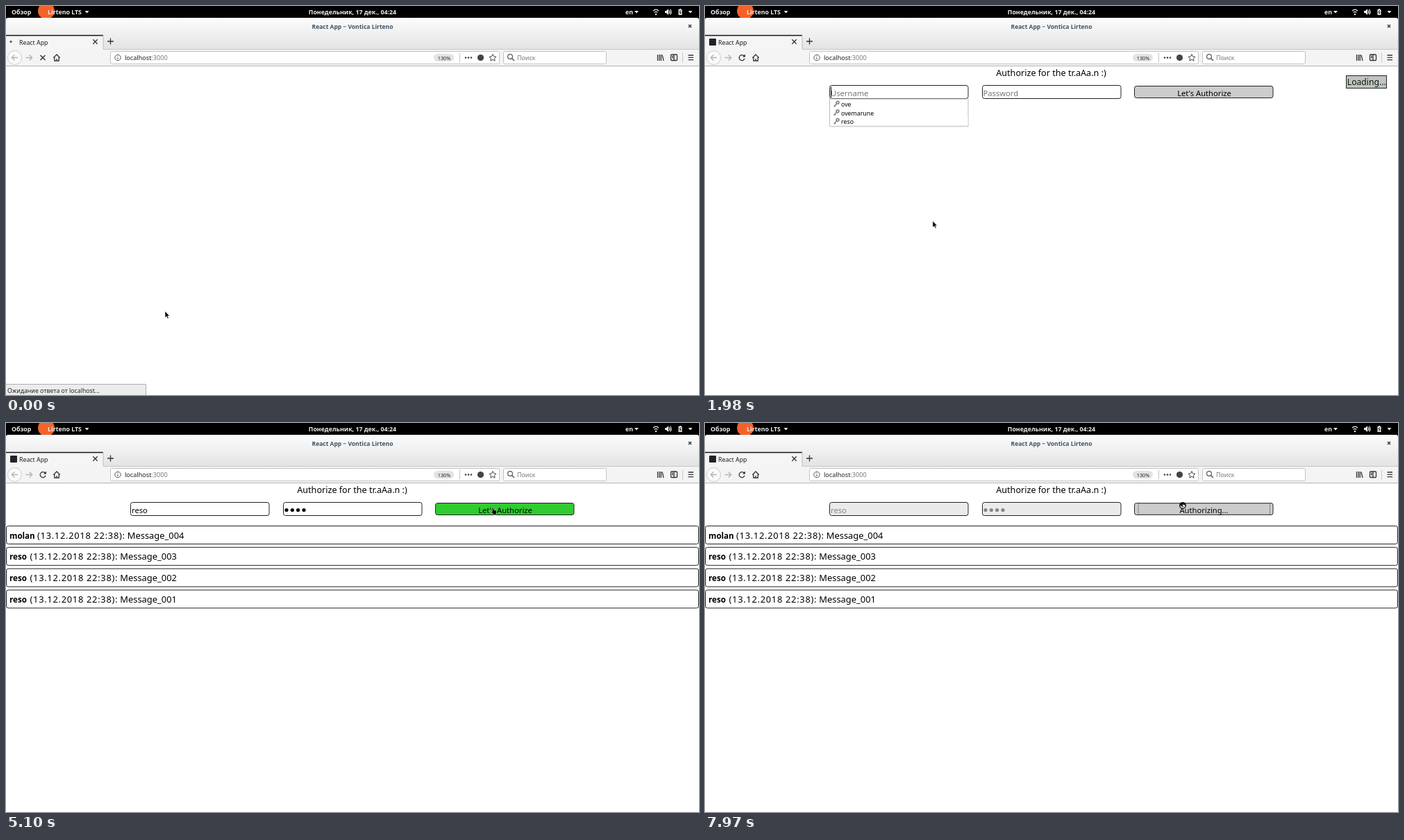
An HTML page for the animation above (8000 ms loop, 998 by 561 pixels).

```html
<!DOCTYPE html>
<html lang="ru">
<head>
<meta charset="utf-8">
<title>React App</title>
<style>
html, body { margin: 0; width: 100%; height: 100%; overflow: hidden; background: #fff; }
svg { display: block; width: 100vw; height: 100vh; font: 8.8px "Noto Sans", "Open Sans", sans-serif; }
.bar { font-weight: 600; fill: #eee; }
.mid { text-anchor: middle; }
.ink { fill: none; stroke: #333; stroke-width: 1.3; }
.off { fill: none; stroke: #b4b4b4; stroke-width: 1.3; }
.box { fill: #fff; stroke: #222; }
.hint { fill: #757575; }
.ctl { font-size: 11.2px; }
.msg { font-size: 12.9px; }
.who { font-size: 11.6px; font-weight: 700; }
.date { letter-spacing: .7px; }

/* one shared 8 s clock; 1% = 80 ms */
.wait, .page, .load, .ready, .blank, .filled, .drop, .row, .green, .label, .field, .value,
.before, .after, .edge, .list, .caret1, .caret2, .arrow, .hand { animation: 8s step-end infinite; }
.wait { animation-name: wait; }
.page { animation-name: page; }
.load { animation-name: load; }
.ready { animation-name: ready; }
.blank { animation-name: blank; }
.filled { animation-name: filled; }
.drop { animation-name: drop; }
.row { animation-name: row; }
.green { animation-name: green; }
.label { animation-name: label, before; }
.field { animation-name: field; }
.value { animation-name: filled, value; }
.after { animation-name: after; }
.edge { animation-name: edge; }
.list { animation-name: list; }
.caret1 { animation-name: caret1; }
.caret2 { animation-name: caret2; }
.arrow { animation-name: arrow; }
.hand { animation-name: hand; }
@keyframes wait { 0% { visibility: visible } 13.625%, to { visibility: hidden } }
@keyframes page { 0% { visibility: hidden } 13.625%, to { visibility: visible } }
@keyframes load { 0%, 51.625%, to { visibility: hidden } 13.625% { visibility: visible } }
@keyframes ready { 0% { visibility: hidden } 18.75%, to { visibility: visible } }
@keyframes blank { 0%, 47.75%, to { visibility: hidden } 13.625% { visibility: visible } }
@keyframes filled { 0% { visibility: hidden } 47.75%, to { visibility: visible } }
@keyframes drop { 0%, 47.75%, to { visibility: hidden } 21.25% { visibility: visible } }
@keyframes row { 0% { fill: #fff } 32.5% { fill: #f0f0f0 } 44.75%, to { fill: #dcdcde } }
@keyframes green { 0%, 73.875%, to { fill: #ccc } 48.375% { fill: #2ecc2e } }
@keyframes label { 0%, 61.125%, to { fill: #000 } 48.375% { fill: #e9f7e9 } }
@keyframes before { 0%, 73.875%, to { visibility: hidden } 13.625% { visibility: visible } }
@keyframes after { 0% { visibility: hidden } 73.875%, to { visibility: visible } }
@keyframes field { 0% { fill: #fff } 73.875%, to { fill: #ebebeb } }
@keyframes value { 0% { fill: #000 } 73.875%, to { fill: #858585 } }
@keyframes edge { 0%, 52.125%, to { visibility: hidden } 51.625% { visibility: visible } }
@keyframes list { 0% { visibility: hidden } 52.125%, to { visibility: visible } }
@keyframes caret1 { 0%, 36.625%, to { visibility: hidden } 13.625% { visibility: visible } }
@keyframes caret2 { 0%, 56.625%, to { visibility: hidden } 47.75% { visibility: visible } }
@keyframes arrow { 0% { visibility: visible } 61.125%, to { visibility: hidden } }
@keyframes hand { 0%, 73.875%, to { visibility: hidden } 61.125% { visibility: visible } }

.pointer { animation: travel 8s ease-in-out infinite; }
@keyframes travel {
  0%, 3.125% { transform: translate(229px, 440px) }
  13.125%, 22.25% { transform: translate(383px, 349px); animation-timing-function: ease-in }
  23.5% { transform: translate(375px, 339px); animation-timing-function: linear }
  28% { transform: translate(207px, 235px) }
  33.75%, 56.625% { transform: translate(349px, 161px) }
  63.75%, 73.87% { transform: translate(700px, 121px) }
  73.875%, 75% { transform: translate(699px, 124px) }
  79% { transform: translate(697px, 110px) }
  84.375% { transform: translate(693px, 124px) }
  87.5% { transform: translate(692px, 107px) }
  90.75%, 93.125% { transform: translate(690px, 121px) }
  96% { transform: translate(689px, 107px) }
  99.6%, to { transform: translate(688px, 119px) }
}
.spin { animation: spin 1s linear infinite; }
@keyframes spin { to { transform: rotate(360deg) } }
.bounce { animation: bounce .8s ease-in-out -.4s infinite alternate; }
@keyframes bounce { from { transform: translateX(-2.5px) } to { transform: translateX(3.5px) } }
</style>
</head>
<body>
<svg viewBox="0 0 998 561">
  <defs>
    <linearGradient id="frame" x2="0" y2="1">
      <stop stop-color="#fcfcfc"/><stop offset="1" stop-color="#e3e3e3"/>
    </linearGradient>
    <clipPath id="top"><path d="M0 0H998V17H0z"/></clipPath>
    <path id="down" d="M0 0h6l-3 3.4z"/>
    <path id="cross" d="M-3.2-3.2l6.4 6.4M3.2-3.2l-6.4 6.4"/>
    <g id="key" fill="none" stroke="#858585">
      <circle cx="6" cy="2.8" r="1.9" stroke-width="1.8"/>
      <path d="M4.6 4.4L.6 8.4M1.6 7.4l1.4 1.2" stroke-width="1.5"/>
    </g>
  </defs>
  <rect width="998" height="561" fill="#fff"/>

  <!-- desktop bar -->
  <rect width="998" height="20" fill="#000"/>
  <circle cx="58" cy="7" r="12" fill="#f4622a" clip-path="url(#top)"/>
  <g class="bar">
    <text x="8" y="12">Обзор</text>
    <text x="60" y="12">Lirteno LTS</text>
    <text x="499" y="12" class="mid">Понедельник, 17 дек., 04:24</text>
    <text x="892" y="12">en</text>
    <use href="#down" x="113.500" y="7"/>
    <use href="#down" x="905" y="7"/>
    <use href="#down" x="982.500" y="7"/>
    <path d="M949 7h2l3-3v9l-3-3h-2z"/>
    <path d="M968.500 5h1.500V4h2v1h1.500v8h-5z"/>
    <circle cx="936" cy="12" r="1.200"/>
  </g>
  <g fill="none" stroke="#eee" stroke-width="1.200">
    <path d="M932 7q4-3.600 8 0M933.600 9.400q2.400-2.200 4.800 0M955 6q2 2.500 0 5M956.500 4.500q3 4 0 8"/>
    <path d="M971.500 6l-1.500 3h2l-1.500 3" stroke="#000" stroke-width=".9"/>
  </g>

  <!-- window frame -->
  <path d="M0 63V20q0-3 3-3H995q3 0 3 3V63z" fill="url(#frame)"/>
  <text x="499" y="32.500" class="mid" font-weight="700" font-size="8.500" fill="#3f5364">React App − Vontica Lirteno</text>
  <use href="#cross" transform="translate(985 29) scale(.62)" stroke="#34424e" stroke-width="2.600"/>
  <rect y="62" width="998" height="25" fill="#f4f4f4"/>
  <path d="M140 62.500H998" stroke="#c6c6c6"/>
  <path d="M0 86.500H998" stroke="#b3b3b3"/>
  <rect y="42" width="140" height="21" fill="#f5f5f5"/>
  <path d="M0 42.500H140" stroke="#15151a" stroke-width="1.600"/>
  <path d="M140 42V62" stroke="#bdbdbd"/>
  <text x="19" y="55.500" fill="#1c1c1c">React App</text>
  <use href="#cross" x="128.500" y="51.500" class="ink"/>
  <path d="M146 51h9M150.500 46.500v9" class="ink"/>
  <rect class="ready" x="6" y="47" width="10" height="10" rx="1" fill="#20232a"/>
  <g class="wait"><circle class="bounce" cx="6.500" cy="51.500" r="1.400" fill="#333"/></g>

  <!-- toolbar -->
  <circle cx="12.500" cy="74.500" r="10" fill="#fafafa" stroke="#c9c9c9"/>
  <path d="M17 74.500H8.500m3.800-4l-4 4l4 4M28.500 74.500H37.500m-3.800-4l4 4l-4 4" class="off"/>
  <use href="#cross" x="53" y="74.500" class="ink wait" transform="translate(-5.300 -7.450) scale(1.100)"/>
  <g class="ready">
    <path d="M56.500 72.300a4 4 0 1 0 .5 3.500" class="ink"/>
    <path d="M58 69.500v4h-4z" fill="#333"/>
  </g>
  <path d="M68.300 74.800l4.700-4.800l4.700 4.800M69.800 74v5h6.400v-5M73 79v-3" class="ink"/>
  <g fill="#fff" stroke="#c3c3c3">
    <rect x="150.500" y="65.500" width="560" height="18" rx="2"/>
    <rect x="716.500" y="65.500" width="148" height="18" rx="2"/>
  </g>
  <circle cx="161" cy="74.500" r="4.200" fill="none" stroke="#555"/>
  <path d="M161 74v3M161 71.800v1.200" stroke="#555"/>
  <text x="171" y="78" font-size="9.100" fill="#222">localhost<tspan fill="#777">:3000</tspan></text>
  <rect x="616" y="69" width="29" height="11" rx="5.500" fill="#e3e3e3"/>
  <text x="631" y="77.500" class="mid" font-size="7.200" fill="#222">130%</text>
  <path d="M653.500 67.500v14M974.500 67.500v14" stroke="#c4c4c4"/>
  <g fill="#444">
    <circle cx="662" cy="74.500" r="1.300"/><circle cx="666" cy="74.500" r="1.300"/><circle cx="670" cy="74.500" r="1.300"/>
    <circle cx="683.500" cy="74.500" r="4.600"/>
  </g>
  <path d="M701 69.600l1.500 3.200 3.500.4-2.600 2.400.7 3.500-3.100-1.800-3.100 1.800.7-3.500-2.600-2.400 3.500-.4z" fill="none" stroke="#444"/>
  <circle cx="726" cy="73" r="3.400" fill="none" stroke="#555" stroke-width="1.200"/>
  <path d="M728.500 75.500l3.500 3.500" stroke="#555" stroke-width="1.500"/>
  <text x="736" y="78" class="hint">Поиск</text>
  <path d="M938.500 70v9M941 70v9M943.300 70v9M945 70.500l2 8.500M982.500 71h7.500M982.500 74.300h7.500M982.500 77.600h7.500" class="ink"/>
  <rect x="957.500" y="70" width="9" height="8.500" rx="1.200" class="ink"/>
  <path d="M962 70v8.500M959 72.500h1.800M959 74.500h1.800" class="ink" stroke-width="1"/>

  <g class="wait">
    <path d="M-1 545.500H201.500V562H-1z" fill="#ececec" stroke="#adadad"/>
    <text x="2" y="557.500" font-size="8.700" fill="#222">Ожидание ответа от localhost...</text>
  </g>

  <!-- web page -->
  <g class="page">
    <text x="498.500" y="101" class="mid" font-size="12.600">Authorize for the tr.aAa.n :)</text>
    <rect class="box field" x="179.500" y="114.500" width="199.500" height="19" rx="3"/>
    <rect class="box field" x="399.500" y="114.500" width="199.500" height="19" rx="3"/>
    <rect class="box green" x="618.500" y="115.500" width="199.500" height="17" rx="3"/>
  </g>
  <g class="blank ctl">
    <text x="181" y="129.500" class="hint">Username</text>
    <text x="400.500" y="129.500" class="hint">Password</text>
  </g>
  <g class="value ctl">
    <text x="181" y="129.500">reso</text>
    <circle cx="404" cy="125.500" r="2.600"/><circle cx="412.300" cy="125.500" r="2.600"/>
    <circle cx="420.600" cy="125.500" r="2.600"/><circle cx="429" cy="125.500" r="2.600"/>
  </g>
  <path class="caret1" d="M181.500 116.500v15.500" stroke="#000"/>
  <path class="caret2" d="M204 117v15" stroke="#000" stroke-width="1.200"/>
  <text x="719" y="129.500" class="mid ctl label">Let's Authorize</text>
  <g class="after">
    <rect x="624" y="116" width="189.500" height="16" fill="none" stroke="#777" stroke-width=".8"/>
    <text x="718.500" y="129.500" class="mid ctl">Authorizing...</text>
  </g>
  <g class="load">
    <rect x="923.500" y="100.500" width="58" height="18" fill="#c2c2c2" stroke="#222"/>
    <text x="952.800" y="114.300" class="mid" font-size="12.200" fill="#061c06">Loading...</text>
  </g>

  <g class="drop">
    <rect x="180" y="135" width="199" height="40" fill="#000" opacity=".07"/>
    <rect x="179.500" y="134" width="199.500" height="39" fill="#fff" stroke="#bcbcbc"/>
    <rect class="row" x="180" y="160" width="198.500" height="12.500"/>
    <use href="#key" x="185" y="136.500"/>
    <use href="#key" x="185" y="149"/>
    <use href="#key" x="185" y="161.500"/>
    <text x="196" y="145">ove</text>
    <text x="196" y="157.500">ovemarune</text>
    <text x="196" y="170">reso</text>
  </g>

  <path class="edge" d="M797 148.500H996" stroke="#222"/>
  <g class="list" id="list"></g>

  <!-- mouse pointer -->
  <g class="pointer">
    <path class="arrow" d="M0 0v9.600l2.200-2 1.500 3.400 1.600-.7-1.500-3.300h2.700z" fill="#000" stroke="#fff" stroke-width=".6"/>
    <path class="hand" d="M0 1q1.200-1 2 0v3l4 1.200q.8.500.6 1.600l-.8 4.200H2L-.8 7q0-1.300 1.400-.6z" fill="#000" stroke="#fff" stroke-width=".5"/>
    <g class="after">
      <circle r="5" fill="#111"/>
      <g class="spin">
        <circle r="2.800" fill="none" stroke="#fff" stroke-width="1.500" stroke-dasharray="9 8.600"/>
        <circle cx="1" r="1.200" fill="#fff"/>
      </g>
    </g>
  </g>
</svg>
<script>
const names = ["molan", "reso", "reso", "reso"];
document.getElementById("list").innerHTML = names.map((name, i) => {
  const y = 148.5 + i * 30.8;
  const x = i ? 34.5 : 45;
  return `<rect class="box" x=".5" y="${y}" width="997" height="26" rx="3"/>
    <text class="msg" x="5" y="${y + 18}"><tspan class="who">${name}</tspan>
    <tspan class="date" x="${x}">(13.12.2018 22:38):</tspan>
    <tspan x="${x + 129.8}">Message_00${4 - i}</tspan></text>`;
}).join("");
</script>
</body>
</html>
```
